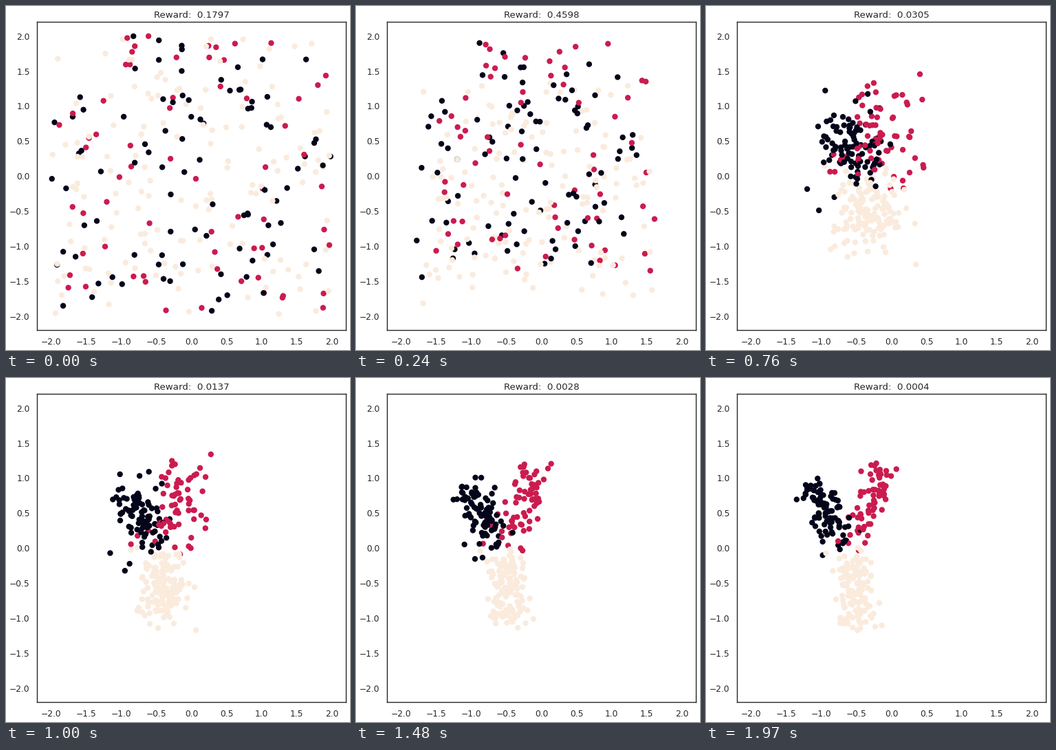
A matplotlib script that plays this animation: 500 by 500 pixels, repeating every 2 s.

```python
import numpy as np
import matplotlib.pyplot as plt
from matplotlib.animation import FuncAnimation

FRAMES, LOOP_MS = 66, 2000
INK = "#262626"

plt.rcParams["font.family"] = "DejaVu Sans"
rng = np.random.default_rng(11)

# count, colour, lobe root, lobe tip, beta shape along the lobe, half width
LOBES = [
    (92, "#03051a", (-0.62, -0.10), (-1.17, 0.98), (2.2, 1.5), 0.135),
    (66, "#cb1b4f", (-0.70, -0.10), (-0.08, 1.20), (1.7, 1.2), 0.115),
    (142, "#faebdd", (-0.60, 0.10), (-0.48, -1.20), (1.9, 1.7), 0.145),
]

# Pace of the gathering: how far each component has come at the key steps
KEYS = np.array([0, 8, 16, 25, 33, 49, 65])
REWARD = np.log([0.1797, 0.4601, 0.1026, 0.0305, 0.0137, 0.0025, 0.0004])
SCATTER = [1, 0.76, 0.37, 0.21, 0.12, 0.04, 0]
SHAPE = [0, 0.10, 0.42, 0.65, 0.80, 0.94, 1]
DRIFT_X = [0, 0.20, 0.42, 0.62, 0.78, 0.93, 1]
DRIFT_Y = [0, 0.38, 0.68, 0.82, 0.88, 0.95, 1]


def ease(values, t):
    """Smooth cubic curve through the values at KEYS."""
    values = np.asarray(values, float)
    slope = np.gradient(values, KEYS)
    i = min(np.searchsorted(KEYS, t, side="right") - 1, len(KEYS) - 2)
    h = KEYS[i + 1] - KEYS[i]
    u = (t - KEYS[i]) / h
    return (values[i] * (1 + 2 * u) * (1 - u) ** 2
            + values[i + 1] * u * u * (3 - 2 * u)
            + h * slope[i] * u * (1 - u) ** 2
            - h * slope[i + 1] * u * u * (1 - u))


def lobe(n, root, tip, shape, width):
    """Points spread around the axis from root to tip."""
    root, axis = np.array(root), np.subtract(tip, root)
    side = np.array([-axis[1], axis[0]]) / np.hypot(*axis)
    along = rng.beta(*shape, n)[:, None]
    across = np.clip(rng.normal(0, width, n), -2.4 * width, 2.4 * width)
    return root + along * axis + across[:, None] * side


centre, offset, colors = [], [], []
for n, color, root, tip, shape, width in LOBES:
    pts = lobe(n, root, tip, shape, width)
    mean = pts.mean(axis=0)
    centre.append(np.tile(mean, (n, 1)))
    offset.append(pts - mean)
    colors += [color] * n

order = rng.permutation(len(colors))
centre = np.concatenate(centre)[order]
offset = np.concatenate(offset)[order]
colors = [colors[i] for i in order]
start = rng.uniform(-2, 2, centre.shape)
pace = rng.uniform(0.65, 1.5, (len(colors), 1))


def positions(t):
    drift = np.array([ease(DRIFT_X, t), ease(DRIFT_Y, t)])
    spread = max(ease(SCATTER, t), 0) ** pace
    return drift * centre + spread * start + ease(SHAPE, t) * offset


fig = plt.figure(figsize=(6.25, 6.25), dpi=80, facecolor="white")
ax = fig.add_axes([45.3 / 500, 28.7 / 500, 449 / 500, 448 / 500])
ax.set(xlim=(-2.2, 2.2), ylim=(-2.2, 2.2))
ticks = np.arange(-2, 2.1, 0.5)
ax.set_xticks(ticks)
ax.set_yticks(ticks)
ax.tick_params(length=0, pad=9.5, labelsize=11, labelcolor=INK)
for spine in ax.spines.values():
    spine.set(edgecolor=INK, linewidth=1.25)

dots = ax.scatter(*start.T, s=36, c=colors, linewidths=1.5)
title = ax.set_title("", fontsize=12, color=INK, pad=6)


def update(t):
    dots.set_offsets(positions(t))
    title.set_text(f"Reward:  {np.exp(ease(REWARD, t)):.4f}")
    return dots, title


anim = FuncAnimation(fig, update, frames=FRAMES, interval=LOOP_MS / FRAMES,
                     repeat=True, repeat_delay=0, blit=False)
plt.show()
```
